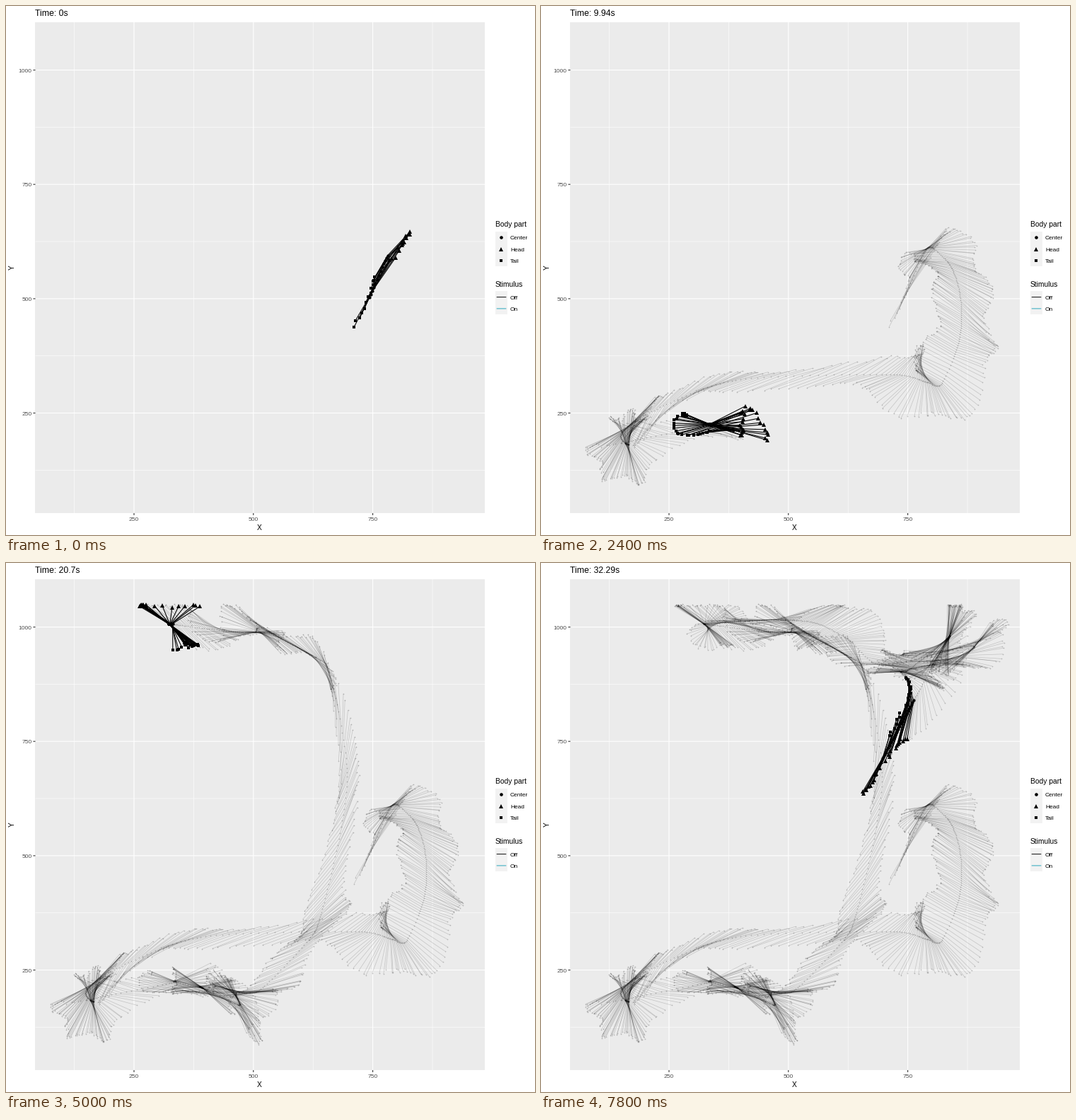
Recreate the animation shown at these times as a matplotlib script. Size 748 by 748 pixels, loop 8000 ms.

```python
import numpy as np
import matplotlib.pyplot as plt
from matplotlib.animation import FuncAnimation
from matplotlib.collections import LineCollection
from matplotlib.patches import Rectangle

SIZE, DPI = 748, 100
PX = 72 / DPI
FRAMES, STEP = 40, 0.82797
RATE, END = 30, 32.72
LEFT, TOP, RIGHT, BOTTOM = 41.5, 22.5, 677, 717
WALL = 60

# Waypoints of the body center: time in s, then stage pixels.
PATH = [
    (0, 514, 412), (0.41, 540, 352), (0.95, 553, 342), (1.4, 575, 362),
    (3.1, 584, 495), (3.4, 567, 533), (3.9, 546, 532), (4.56, 500, 521),
    (5.38, 273, 529), (6.2, 147, 578), (6.7, 118, 599), (8.1, 124, 620),
    (8.9, 130, 614), (9.5, 237, 593), (9.95, 238, 592), (10.35, 273, 600),
    (11.2, 274, 599), (12.4, 329, 625), (13.6, 327, 606), (14.3, 358, 604),
    (15.05, 435, 523), (15.4, 444, 500), (16.4, 482, 290), (16.98, 455, 148),
    (17.35, 434, 132), (18.3, 356, 92), (18.8, 352, 98), (20.4, 231, 86),
    (20.95, 232, 86), (23, 392, 86), (23.7, 437, 110), (24.2, 475, 143),
    (24.95, 600, 118), (26.2, 578, 136), (26.9, 512, 152), (27.7, 516, 153),
    (29.6, 575, 107), (31, 570, 115), (31.87, 528, 192), (32.72, 482, 278),
]
# Where the head points: time in s, then degrees clockwise from the right.
TURNS = [
    (0, -65), (0.41, -46), (0.95, -2), (1.4, 18), (2.5, 38), (3.1, 22),
    (3.9, 88), (4.56, 158), (5.38, 158), (6.2, 122), (6.7, 150), (7.5, 118),
    (8.1, 92), (8.7, 48), (9.1, 5), (9.5, 22), (9.95, -27), (10.35, 22),
    (10.8, 38), (11.2, -10), (12.4, 70), (13.6, 5), (15.05, -36), (16.4, -80),
    (16.98, -115), (17.35, -150), (18.3, -138), (18.9, -190), (20.05, -120),
    (20.45, -145), (20.75, -140), (21.1, -38), (23, -35), (24.2, 8),
    (24.95, -28), (25.4, -50), (26.2, 12), (26.9, -8), (27.7, 30),
    (29.6, -58), (31.1, -55), (31.6, 75), (32.72, 115),
]


def glide(keys, t):
    """Cubic Hermite curve through the keys, with softened tangents."""
    keys = np.array(keys, float)
    kt, kp = keys[:, 0], keys[:, 1:]
    slope = 0.75 * np.gradient(kp, kt, axis=0)
    i = np.clip(np.searchsorted(kt, t, "right") - 1, 0, len(kt) - 2)
    h = (kt[i + 1] - kt[i])[:, None]
    u = (t - kt[i])[:, None] / h
    return ((1 + 2 * u) * (1 - u) ** 2 * kp[i] + u * (1 - u) ** 2 * h * slope[i]
            + u * u * (3 - 2 * u) * kp[i + 1] + u * u * (u - 1) * h * slope[i + 1])


def trailing(angle, delay):
    """The angle followed with an exponential lag."""
    out = angle.copy()
    for i in range(1, len(out)):
        out[i] = out[i - 1] + (angle[i] - out[i - 1]) / (RATE * delay)
    return out


def crawl(t):
    """Center, head and tail: a bending body that stretches as it crawls."""
    rng = np.random.default_rng(4)
    gait = 2 * np.pi * 1.2 * t
    center = glide(PATH, t)
    aim = np.radians(glide(TURNS, t)[:, 0])
    drag = trailing(aim, 0.25)

    def end(angle, mean, phase):
        angle = angle + 0.08 * np.sin(0.77 * gait + phase) + rng.normal(0, 0.03, len(t))
        reach = mean + 8 * np.sin(gait + phase) + rng.normal(0, 1.5, len(t))
        return center + (reach * [np.cos(angle), np.sin(angle)]).T

    body = np.stack([end(aim, 52, 1), center, end(drag + np.pi, 42, 2.5)], axis=1)
    body[:, :, 1] = np.maximum(body[:, :, 1], WALL + rng.normal(0, 1, (len(t), 1)))
    return body


times = np.arange(0, END, 1 / RATE)
bodies = crawl(times)

plt.rcParams["font.family"] = "Liberation Sans"
fig = plt.figure(figsize=(SIZE / DPI, SIZE / DPI), dpi=DPI, facecolor="white")
ax = fig.add_axes([0, 0, 1, 1])
ax.set_xlim(0, SIZE)
ax.set_ylim(SIZE, 0)
ax.axis("off")


def label(x, y, s, size, color="black", **kw):
    kw.setdefault("va", "baseline")
    return ax.text(x, y, s, fontsize=size * PX, color=color, **kw)


def line(x, y, color, width, z=1):
    ax.plot(x, y, color=color, lw=width * PX, zorder=z,
            solid_capstyle="butt", snap=False)


def box(x, y, w, h, color):
    ax.add_patch(Rectangle((x, y), w, h, fc=color, ec="none", zorder=0))


def markers(shape, size, **kw):
    return ax.plot([], [], shape, color="black", ms=size * PX, mew=0, **kw)[0]


box(LEFT, TOP, RIGHT - LEFT, BOTTOM - TOP, "#EBEBEB")
for k in range(1, 9):
    width = 0.55 if k % 2 else 1.1
    x, y = 12.2 + 84.4 * k, 737.2 - 80.83 * k
    if k < 8:
        line([x, x], [TOP, BOTTOM], "white", width)
    line([LEFT, RIGHT], [y, y], "white", width)
    if k % 2 == 0:
        line([LEFT - 3, LEFT], [y, y], "#333333", 1.1)
        label(LEFT - 5, y + 3.2, str(125 * k), 8.5, "#4D4D4D", ha="right")
        if k < 8:
            line([x, x], [BOTTOM, BOTTOM + 3], "#333333", 1.1)
            label(x, 728.3, str(125 * k), 8.5, "#4D4D4D", ha="center")

label(358.7, 741, "X", 10.2, ha="center")
label(8.5, 369.5, "Y", 10.2, ha="center", va="center", rotation=90)
title = label(41, 14, "", 12.2)

label(692, 312.3, "Body part", 10.2)
for row, (name, shape, size) in enumerate(
        [("Center", "o", 4.6), ("Head", "^", 6), ("Tail", "s", 4.8)]):
    y = 327.3 + 16.3 * row
    box(692, y - 8.3, 17, 16.6, "#F2F2F2")
    markers(shape, size).set_data([700.3], [y])
    label(713, y + 3, name, 8.4)
label(692, 397.3, "Stimulus", 10.2)
for row, (name, color) in enumerate([("Off", "#222222"), ("On", "#3FAFC2")]):
    y = 411.6 + 16.3 * row
    box(692, y - 8.3, 17, 16.6, "#F2F2F2")
    line([693.7, 707.3], [y, y], color, 1.1, 3)
    label(713, y + 3.2, name, 8.4)

trail = LineCollection([], colors=[(0, 0, 0, 0.16)], linewidths=0.75 * PX, zorder=3)
live = LineCollection([], colors="black", linewidths=1.07 * PX, zorder=5)
ax.add_collection(trail, autolim=False)
ax.add_collection(live, autolim=False)
dots = markers("o", 1.7, alpha=0.22, zorder=4)
parts = [markers(shape, size, zorder=6)
         for shape, size in (("^", 6.2), ("o", 4.2), ("s", 4.9))]


def draw(k):
    now = k * STEP
    past = bodies[times < now - STEP / 2]
    present = bodies[np.abs(times - now) <= STEP / 2]
    trail.set_segments(past)
    live.set_segments(present)
    dots.set_data(past[:, :, 0].ravel(), past[:, :, 1].ravel())
    for j, part in enumerate(parts):
        part.set_data(present[:, j, 0], present[:, j, 1])
    title.set_text(f"Time: {round(now, 2):g}s")
    return [trail, live, dots, title, *parts]


anim = FuncAnimation(fig, draw, frames=FRAMES, interval=200, repeat=True,
                     repeat_delay=0, blit=False)
plt.show()
```
